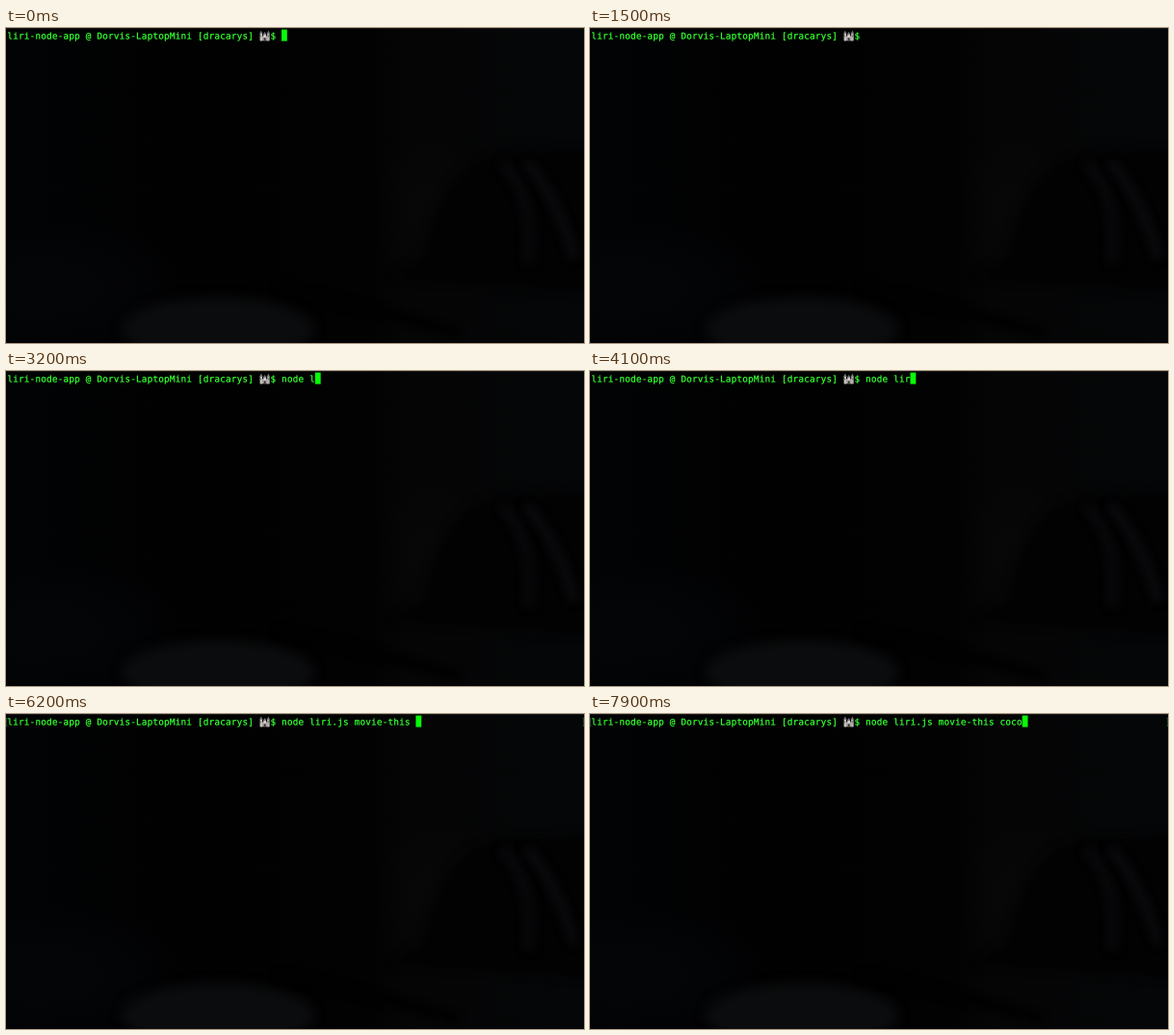
Write an HTML page with a canvas that moves like this. It is 600 by 328 pixels and loops after 8 s.

```html
<!DOCTYPE html>
<html lang="en">
<head>
<meta charset="utf-8">
<title>Terminal</title>
<style>
  html, body { margin: 0; width: 100%; height: 100%; overflow: hidden; background: #020203; }
  canvas { display: block; width: 600px; height: 328px; }
</style>
</head>
<body>
<canvas id="stage" width="600" height="328"></canvas>
<script>
const W = 600, H = 328, LOOP = 8000;
const CELL = 5.81, LEFT = 1.3, BASE = 11.6;
const LINE = 16, FINE = 4;

const ctx = document.getElementById('stage').getContext('2d');
ctx.imageSmoothingQuality = 'high';

// The text line is drawn enlarged, then reduced, for smooth subpixel glyphs
const strip = document.createElement('canvas');
strip.width = W * FINE;
strip.height = LINE * FINE;
const pen = strip.getContext('2d');
pen.scale(FINE, FINE);
pen.font = '9.4px "DejaVu Sans Mono", monospace';
pen.fillStyle = pen.strokeStyle = '#30f52c';
pen.lineWidth = 0.3;
pen.lineJoin = 'round';

const HOST = 'liri-node-app @ Dorvis-LaptopMini [dracarys] ';
const COMMAND = 'node liri.js movie-this coco';
const ICON_COL = HOST.length;
const DOLLAR_COL = ICON_COL + 2;
const INPUT_COL = DOLLAR_COL + 2;

// [time, typed characters]
const KEYS = [
  [0, 0], [1800, 1], [2000, 2], [2400, 3], [2700, 4], [2800, 5], [3200, 6],
  [3800, 7], [4100, 8], [4600, 13], [5600, 23], [6200, 24], [6900, 25],
  [7000, 26], [7600, 27], [7900, 28]
];
const BLINKS = [[500, 1000], [1500, 1800], [5500, 5600], [7500, 7600]];
const MARKS_FROM = 4600;

const colX = col => LEFT + col * CELL;

function glow(g, x, y, rx, ry, rgb, alpha) {
  g.save();
  g.translate(x, y);
  g.scale(rx, ry);
  const fill = g.createRadialGradient(0, 0, 0, 0, 0, 1);
  fill.addColorStop(0, `rgba(${rgb},${alpha})`);
  fill.addColorStop(0.5, `rgba(${rgb},${alpha * 0.6})`);
  fill.addColorStop(1, `rgba(${rgb},0)`);
  g.fillStyle = fill;
  g.fillRect(-1, -1, 2, 2);
  g.restore();
}

function band(g, color, width, x, y, cx, cy, ex, ey) {
  g.strokeStyle = color;
  g.lineWidth = width;
  g.beginPath();
  g.moveTo(x, y);
  g.quadraticCurveTo(cx, cy, ex, ey);
  g.stroke();
}

// Dim wallpaper showing through the window
function makeBackdrop() {
  const c = document.createElement('canvas');
  c.width = W;
  c.height = H;
  const g = c.getContext('2d');
  const base = g.createLinearGradient(0, 0, W, 0);
  base.addColorStop(0, '#020304');
  base.addColorStop(0.3, '#010102');
  base.addColorStop(0.63, '#020203');
  base.addColorStop(0.69, '#050506');
  base.addColorStop(1, '#050607');
  g.fillStyle = base;
  g.fillRect(0, 0, W, H);

  glow(g, 60, 270, 130, 70, '7,9,12', 0.5);
  glow(g, 440, 190, 60, 80, '10,10,11', 0.4);

  g.filter = 'blur(6px)';
  g.fillStyle = '#0b0c0d';
  g.beginPath();
  g.ellipse(220, 314, 100, 34, 0, 0, 7);
  g.fill();

  g.filter = 'blur(5px)';
  g.fillStyle = '#020203';
  g.beginPath();
  g.moveTo(435, 238);
  g.bezierCurveTo(440, 185, 470, 132, 520, 132);
  g.lineTo(610, 126);
  g.lineTo(610, 275);
  g.lineTo(400, 260);
  g.closePath();
  g.fill();

  band(g, '#09090b', 10, 515, 140, 550, 175, 542, 245);
  band(g, '#0c0b0d', 9, 540, 140, 572, 175, 590, 240);

  g.filter = 'blur(3px)';
  band(g, '#010101', 10, 280, 272, 370, 288, 470, 318);
  g.filter = 'none';

  g.fillStyle = '#161617';
  g.fillRect(0, 0, W, 1);
  return c;
}

function text(str, col) {
  [...str].forEach((ch, i) => {
    const x = colX(col + i) + 0.1;
    pen.fillText(ch, x, BASE);
    pen.strokeText(ch, x, BASE);
  });
}

function castle(x, y) {
  const box = (color, ...r) => {
    ctx.fillStyle = color;
    ctx.fillRect(x + r[0], y + r[1], r[2], r[3]);
  };
  const roof = (cx, top, half, h) => {
    ctx.fillStyle = '#77777c';
    ctx.beginPath();
    ctx.moveTo(x + cx, y + top);
    ctx.lineTo(x + cx + half, y + top + h);
    ctx.lineTo(x + cx - half, y + top + h);
    ctx.fill();
  };
  box('#a9a5a2', 1, 6, 9.5, 5);
  box('#c4c0bc', 0.8, 3.5, 2.4, 7.5);
  box('#b5b1ae', 8.3, 3.5, 2.4, 7.5);
  box('#cfcac5', 4.4, 4, 2.8, 4);
  roof(2, 0.3, 1.7, 3.4);
  roof(9.5, 0.3, 1.7, 3.4);
  roof(5.8, 1.6, 1.8, 2.8);
  box('#3d3835', 4.8, 8, 2, 3);
  box('#55504d', 1.6, 5.4, 0.8, 1.5);
  box('#55504d', 9.1, 5.4, 0.8, 1.5);
}

// Bracket marks at both ends of the prompt line
function marks() {
  ctx.fillStyle = '#2c5a2b';
  ctx.fillRect(0, 4, 0.7, 9);
  ctx.fillRect(W - 0.7, 4, 0.7, 9);
  for (const y of [4, 12.4]) {
    ctx.fillRect(0, y, 1.6, 0.6);
    ctx.fillRect(W - 1.6, y, 1.6, 0.6);
  }
}

const backdrop = makeBackdrop();

function draw(t) {
  const typed = KEYS.filter(k => k[0] <= t).pop()[1];
  const hidden = BLINKS.some(([from, to]) => t >= from && t < to);

  ctx.drawImage(backdrop, 0, 0);
  pen.clearRect(0, 0, W, LINE);
  text(HOST, 0);
  text('$', DOLLAR_COL);
  text(COMMAND.slice(0, typed), INPUT_COL);
  ctx.drawImage(strip, 0, 0, W, LINE);
  castle(colX(ICON_COL) + 0.1, 2.3);

  if (t >= MARKS_FROM) marks();
  if (!hidden) {
    ctx.fillStyle = '#08fc08';
    ctx.fillRect(colX(INPUT_COL + typed), 1.6, CELL, 12);
  }
}

const start = performance.now();
function tick() {
  draw((performance.now() - start) % LOOP);
  requestAnimationFrame(tick);
}
tick();
</script>
</body>
</html>
```
